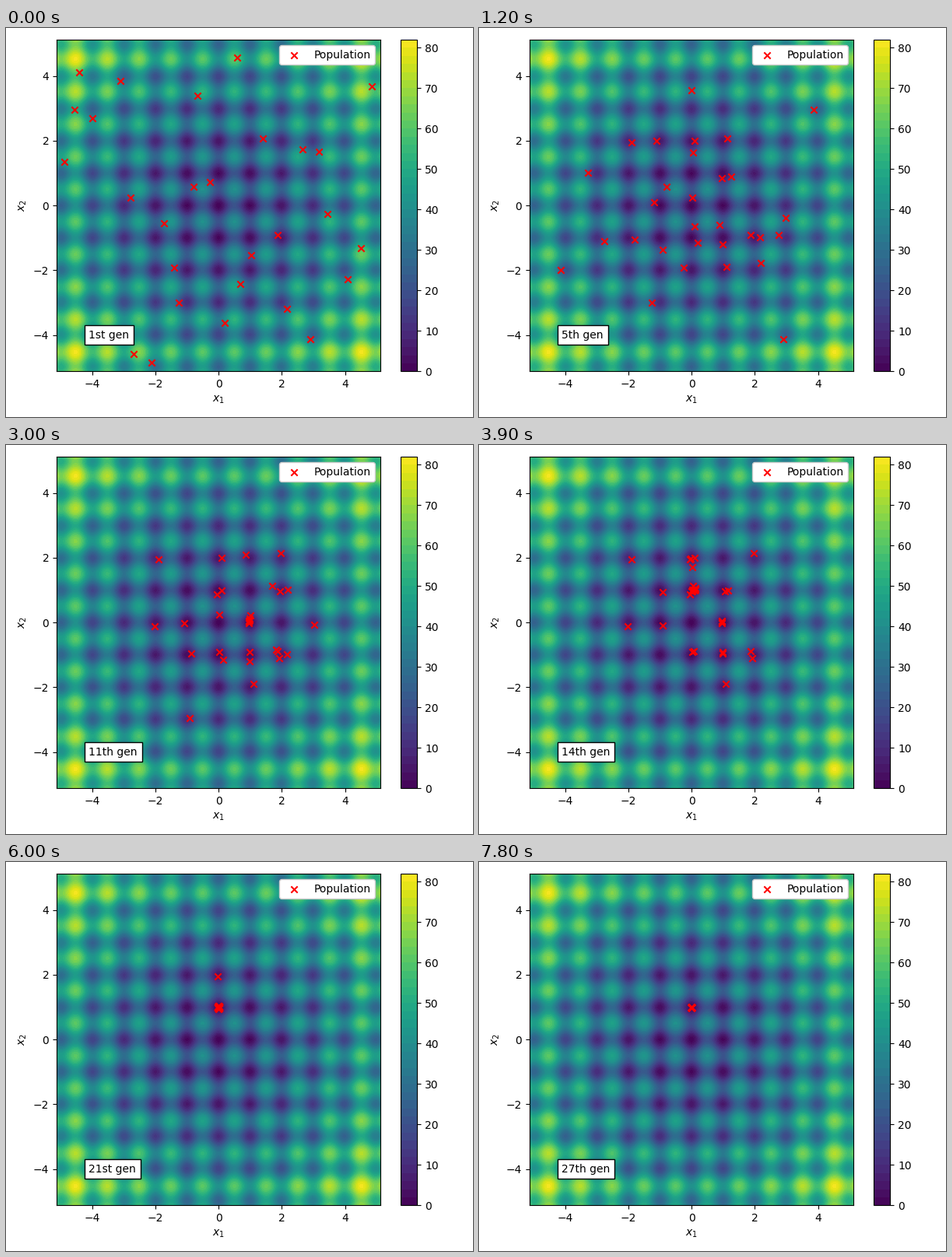
These frames come from a looping animation (600x500 px, 8 s). A matplotlib script:

```python
import matplotlib.pyplot as plt
import numpy as np
from matplotlib.animation import FuncAnimation

LIMIT = 5.12
SIZE = 30
GENERATIONS = 27
CROSSOVER = 0.7
INTERVAL = 100
LOOP = 8000
GEN_TIME = 300


def rastrigin(x, y):
    return 20 + x**2 + y**2 - 10 * (np.cos(2 * np.pi * x) + np.cos(2 * np.pi * y))


def latin_hypercube(rng):
    """One point in each of SIZE rows and SIZE columns."""
    cells = np.column_stack([rng.permutation(SIZE), rng.permutation(SIZE)])
    return LIMIT * (2 * (cells + rng.uniform(size=(SIZE, 2))) / SIZE - 1)


def trial(points, costs, i, scale, rng):
    """Mutate around the best point and cross with member i."""
    others = np.delete(np.arange(SIZE), i)
    a, b = rng.choice(others, 2, replace=False)
    mutant = points[np.argmin(costs)] + scale * (points[a] - points[b])
    mixed = rng.uniform(size=2) < CROSSOVER
    mixed[rng.randint(2)] = True
    candidate = np.where(mixed, mutant, points[i])
    outside = np.abs(candidate) > LIMIT
    return np.where(outside, rng.uniform(-LIMIT, LIMIT, 2), candidate)


def evolve(seed):
    """Differential evolution: the population of every generation."""
    rng = np.random.RandomState(seed)
    points = latin_hypercube(rng)
    costs = rastrigin(*points.T)
    history = [points.copy()]
    while len(history) < GENERATIONS:
        scale = rng.uniform(0.5, 1)
        for i in range(SIZE):
            candidate = trial(points, costs, i, scale, rng)
            cost = rastrigin(*candidate)
            if cost < costs[i]:
                points[i], costs[i] = candidate, cost
        history.append(points.copy())
    return history


def ordinal(n):
    if n % 100 in (11, 12, 13):
        return f"{n}th"
    return f"{n}" + {1: "st", 2: "nd", 3: "rd"}.get(n % 10, "th")


history = evolve(seed=4)

fig, ax = plt.subplots(figsize=(6, 5), dpi=100)
axis = np.linspace(-LIMIT, LIMIT, 200)
gx, gy = np.meshgrid(axis, axis)
surface = ax.contourf(gx, gy, rastrigin(gx, gy), levels=np.arange(0, 83, 2), cmap="viridis")
fig.colorbar(surface, ax=ax, ticks=range(0, 81, 10))

ax.set(xlim=(-LIMIT, LIMIT), ylim=(-LIMIT, LIMIT), xlabel="$x_1$", ylabel="$x_2$",
       xticks=range(-4, 5, 2), yticks=range(-4, 5, 2))
crosses = ax.scatter(*history[0].T, marker="x", color="red", label="Population")
ax.legend(loc="upper right", framealpha=1)
label = ax.text(-4.1, -4.1, "1st gen", bbox=dict(facecolor="white", edgecolor="black"))
fig.tight_layout()


def update(frame):
    index = frame * INTERVAL // GEN_TIME
    crosses.set_offsets(history[index])
    label.set_text(f"{ordinal(index + 1)} gen")
    return crosses, label


anim = FuncAnimation(fig, update, frames=LOOP // INTERVAL, interval=INTERVAL,
                     repeat=True, repeat_delay=0)
plt.show()
```
